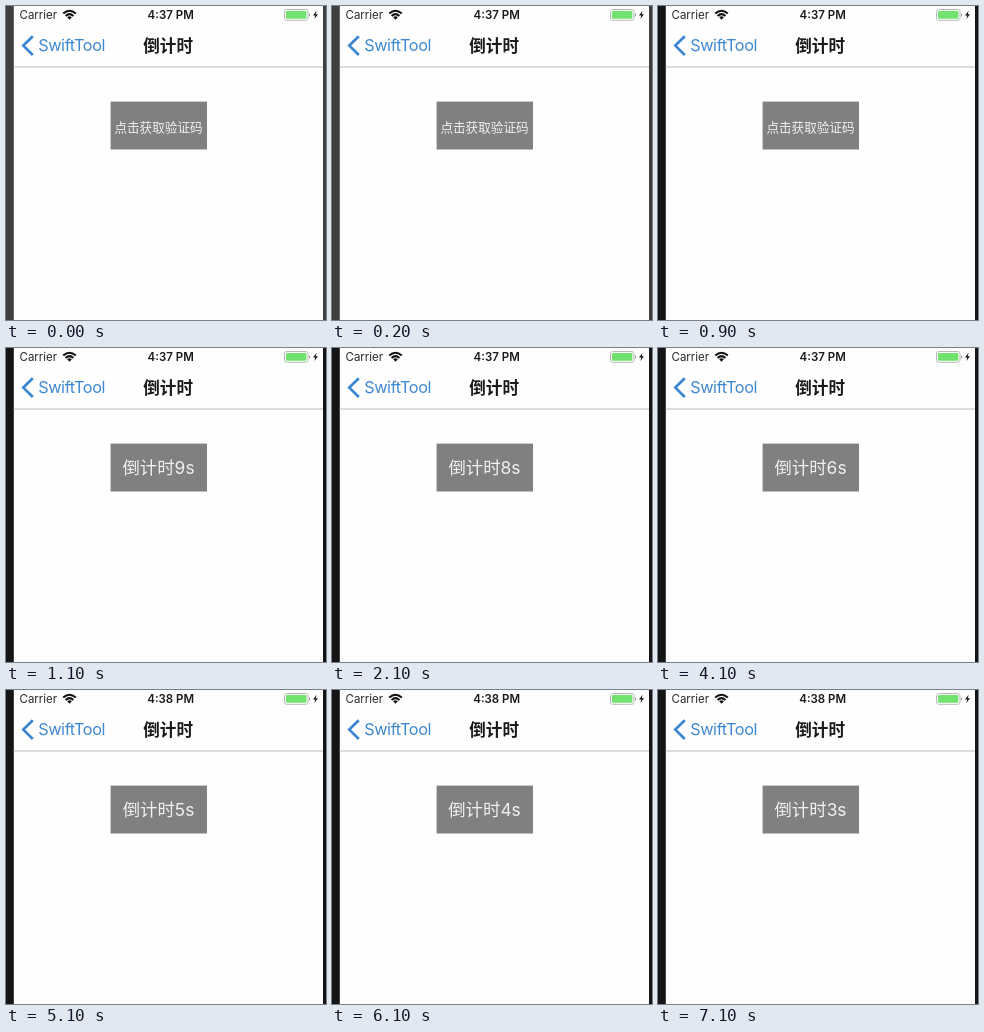
Recreate the animation shown at these times as an HTML page. Size 320 by 314 pixels, loop 8000 ms.

```html
<!DOCTYPE html>
<html lang="zh-CN">
<head>
<meta charset="utf-8">
<title>倒计时</title>
<style>
  html, body { margin: 0; width: 100%; height: 100%; overflow: hidden; }
  svg { display: block; width: 100%; height: 100%; }
  text { font-family: Inter, "Noto Sans CJK SC", "Noto Sans CJK", sans-serif; }
  .middle { text-anchor: middle; }
</style>
</head>
<body>
<svg viewBox="0 0 320 314">
  <rect id="desk" width="320" height="314"/>
  <rect x="7.8" width="309.2" height="314" fill="#fefefe"/>

  <!-- status bar -->
  <text x="13.5" y="13.2" font-size="11.5" fill="#2a2a2a">Carrier</text>
  <g fill="none" stroke="#111" stroke-width="2">
    <path d="M57.2 7.6Q63.5 1.8 69.8 7.6"/>
    <path d="M59.6 10Q63.5 6.3 67.4 10"/>
  </g>
  <path d="M61.2 11.3Q63.5 9.3 65.8 11.3L63.5 13.8Z" fill="#111"/>
  <text id="clock" class="middle" x="164.7" y="13.2" font-size="11.5" font-weight="600" fill="#1a1a1a"></text>
  <rect x="278.5" y="3.5" width="23.5" height="10.8" rx="2.2" fill="#fff" stroke="#b4bcb4"/>
  <rect x="280" y="5" width="20.4" height="7.8" rx="1" fill="#70e26d"/>
  <path d="M303 7.2v3.6q1.2-.5 1.2-1.8t-1.2-1.8" fill="#999"/>
  <path d="M310.6 4.8L307 9.5H309.2L308.4 13L312 8.2H309.8Z" fill="#1a1a1a"/>

  <!-- navigation bar -->
  <path d="M26.8 30.2L17.3 39.6L26.8 49" fill="none" stroke="#3a86d2" stroke-width="2.7"/>
  <text x="32.2" y="45.4" font-size="16.3" letter-spacing="-.42" fill="#3f88d2">SwiftTool</text>
  <text class="middle" x="162.1" y="46" font-size="16.6" font-weight="600" fill="#1a1a1a">倒计时</text>
  <rect x="7.8" y="60.4" width="309.2" height="1.2" fill="#c8c8c8"/>

  <!-- button -->
  <rect x="104.6" y="95.6" width="96.4" height="47.9" fill="#808080"/>
  <text id="label" class="middle" x="152.5" fill="#f0f0f0"></text>
</svg>
<script>
const LOOP = 8000, FOCUS = 900, START = 1100, MINUTE = 4200;
const [desk, clock, label] = ["desk", "clock", "label"].map(id => document.getElementById(id));

function setText(node, value) {
  if (node.textContent !== value) node.textContent = value;
}

function draw(now) {
  const t = now % LOOP;
  const counting = t >= START;
  const seconds = 9 - Math.floor((t - START) / 1000);
  desk.setAttribute("fill", t < FOCUS ? "#3f3f3f" : "#151515");
  setText(clock, t < MINUTE ? "4:37 PM" : "4:38 PM");
  setText(label, counting ? `倒计时${seconds}s` : "点击获取验证码");
  label.setAttribute("font-size", counting ? 17.4 : 12.6);
  label.setAttribute("y", counting ? 126 : 126.4);
  requestAnimationFrame(draw);
}
draw(performance.now());
</script>
</body>
</html>
```
